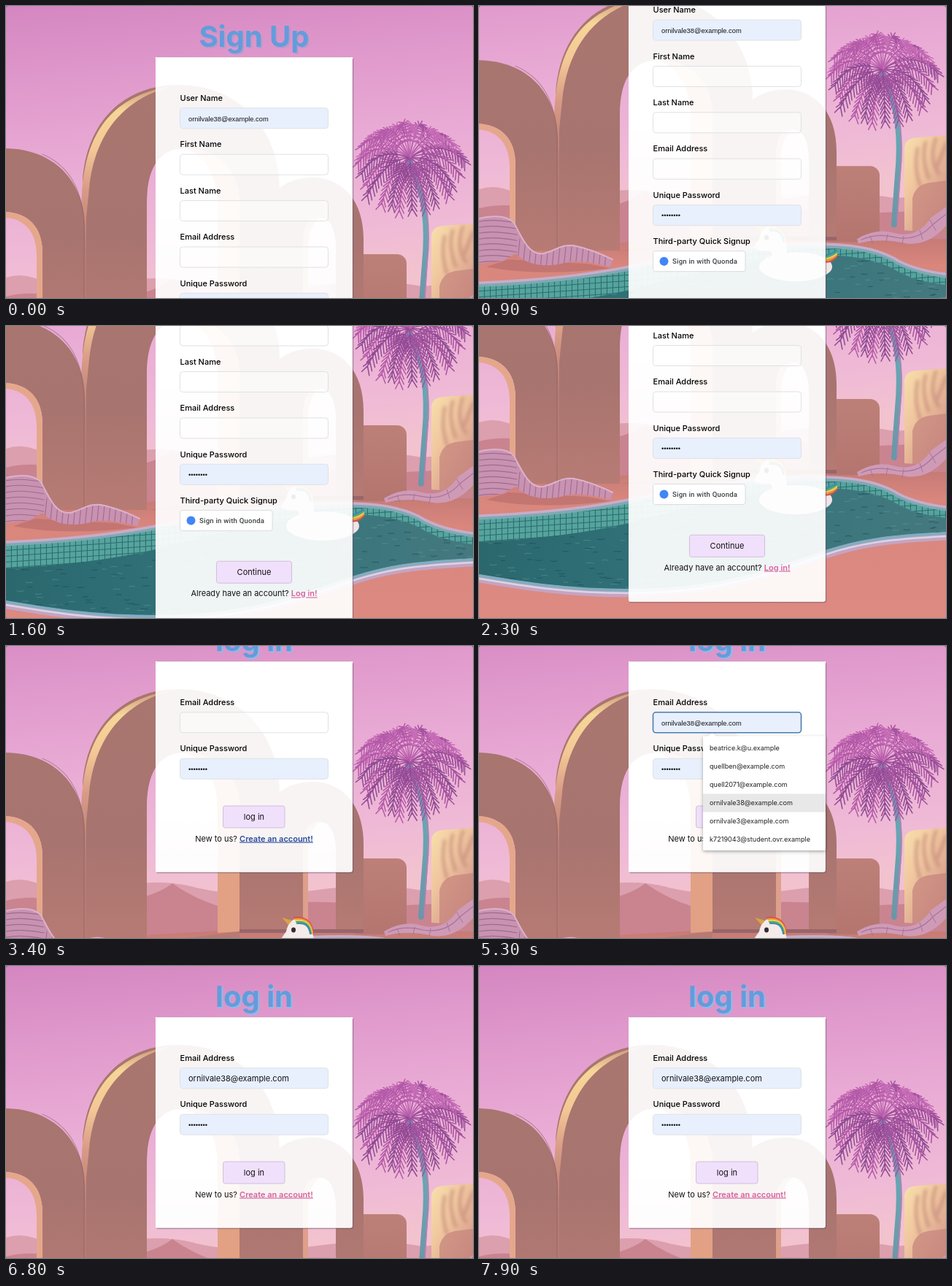
Write an HTML page that moves like this. It is 640 by 400 pixels and loops after 8000 ms.

```html
<!DOCTYPE html>
<html lang="en">
<head>
<meta charset="utf-8">
<title>Sign up and log in</title>
<style>
  html, body { margin: 0; width: 100%; height: 100%; overflow: hidden; background: #6d5c6c; }
  svg { display: block; width: 100vw; height: 100vh; border-radius: 3px; }
  text { font: 400 11px Inter, "Open Sans", sans-serif; fill: #111; }
  .title { font-size: 40px; font-weight: 700; text-anchor: middle; }
  .label { font-weight: 500; fill: #000; }
  .mid { text-anchor: middle; }
  .link { font-weight: 600; text-decoration: underline; }
  .plain { font: 400 9.3px "Liberation Sans", Arial, sans-serif; }
  .option { font-size: 9.1px; fill: #222; }
  .brand { font: 500 9.6px Roboto, sans-serif; fill: #3c4043; letter-spacing: .2px; }
</style>
</head>
<body>
<svg viewBox="0 0 640 400" preserveAspectRatio="none">
  <defs>
    <linearGradient id="sky" gradientUnits="userSpaceOnUse" x1="0" y1="0" x2="40" y2="410">
      <stop offset="0" stop-color="#d486c0"/><stop offset=".25" stop-color="#df98cb"/>
      <stop offset=".55" stop-color="#e9abd5"/><stop offset=".85" stop-color="#efbad6"/>
      <stop offset="1" stop-color="#f2c2cf"/>
    </linearGradient>
    <linearGradient id="veil" gradientUnits="userSpaceOnUse" x1="0" y1="280" x2="0" y2="420">
      <stop offset="0" stop-color="#fff"/><stop offset="1" stop-color="#fff" stop-opacity="0"/>
    </linearGradient>
    <linearGradient id="clay" gradientUnits="userSpaceOnUse" x1="0" y1="110" x2="0" y2="456">
      <stop offset="0" stop-color="#a97670"/><stop offset=".6" stop-color="#a8746f"/><stop offset="1" stop-color="#b77b74"/>
    </linearGradient>
    <linearGradient id="lit" gradientUnits="userSpaceOnUse" x1="0" y1="108" x2="0" y2="330">
      <stop offset="0" stop-color="#c99280"/><stop offset=".16" stop-color="#f6d697"/>
      <stop offset=".4" stop-color="#f3c795"/><stop offset=".65" stop-color="#d79a86"/><stop offset="1" stop-color="#b67d75"/>
    </linearGradient>
    <linearGradient id="cream" x1="0" y1="0" x2=".8" y2="1">
      <stop offset="0" stop-color="#f8e0ac"/><stop offset=".4" stop-color="#f0c79f"/><stop offset="1" stop-color="#cf8f86"/>
    </linearGradient>
    <linearGradient id="block" x1="0" y1="0" x2="0" y2="1">
      <stop offset="0" stop-color="#bd8079"/><stop offset="1" stop-color="#b4756f"/>
    </linearGradient>
    <linearGradient id="floor" gradientUnits="userSpaceOnUse" x1="0" y1="436" x2="0" y2="640">
      <stop offset="0" stop-color="#c47a75"/><stop offset=".2" stop-color="#d9867d"/><stop offset="1" stop-color="#dd8a83"/>
    </linearGradient>
    <linearGradient id="water" x1="0" y1="0" x2="1" y2="0">
      <stop offset="0" stop-color="#2a686e"/><stop offset=".5" stop-color="#33747a"/><stop offset="1" stop-color="#44797f"/>
    </linearGradient>
    <linearGradient id="trunk" x1="0" y1="0" x2="0" y2="1">
      <stop offset="0" stop-color="#7c80ac"/><stop offset=".4" stop-color="#67a6b4"/><stop offset="1" stop-color="#6b96a8"/>
    </linearGradient>
    <pattern id="tiles" width="8" height="8" patternUnits="userSpaceOnUse" patternTransform="skewY(-4)">
      <rect width="8" height="8" fill="#2d6a6c"/><rect width="7" height="7" fill="#55a49e"/>
    </pattern>
    <clipPath id="pool"><path id="poolShape"/></clipPath>
    <clipPath id="seat"><path id="seatShape"/></clipPath>
    <filter id="soft"><feGaussianBlur stdDeviation="2.2"/></filter>
    <filter id="lift" x="-10%" y="-10%" width="120%" height="125%">
      <feDropShadow dx="0" dy="1.5" stdDeviation="2" flood-color="#000" flood-opacity=".35"/>
    </filter>
  </defs>
  <g id="page">
    <g id="scene"></g>
    <g id="signup"></g>
    <g id="login"></g>
  </g>
  <g id="menu" filter="url(#lift)"></g>
</svg>
<script>
const $ = id => document.getElementById(id);
const LOOP = 8000, STEP = 100;
const PINK = [214, 98, 156], BLUE = [43, 76, 158];
const MAIL = 'ornilvale38@example.com';
const options = ['beatrice.k@u.example', 'quellben@example.com', 'quell2071@example.com',
  MAIL, 'ornilvale3@example.com', 'k7219043@student.ovr.example'];

let seed = 7;
const rand = (a, b) => {
  seed = (seed * 16807) % 2147483647;
  return a + (b - a) * seed / 2147483647;
};
const shape = (d, fill, more = '') => `<path d="${d}" fill="${fill}" ${more}/>`;
const line = (d, color, w, more = '') =>
  `<path d="${d}" fill="none" stroke="${color}" stroke-width="${w}" stroke-linecap="round" ${more}/>`;
const text = (x, y, s, cls, more = '') => `<text x="${x}" y="${y}" class="${cls}" ${more}>${s}</text>`;
const box = (x, y, w, h, fill, stroke = 'none', r = 3, more = '') =>
  `<rect x="${x}" y="${y}" width="${w}" height="${h}" rx="${r}" fill="${fill}" stroke="${stroke}" ${more}/>`;

// Scenery, in page coordinates
const BACK = 'M0 502 Q120 497 205 480 C300 462 380 447 475 449 Q540 450 575 472 Q600 485 640 490';
const FRONT = 'M640 524 C560 528 520 534 475 549 C400 575 330 602 205 602 C120 602 60 592 0 582';
const POOL = BACK + FRONT.replace('M', 'L') + 'Z';
const SEAT = 'M0 412 Q35 404 48 418 C62 445 70 462 88 460 C105 456 112 447 130 449 Q155 454 183 468 ' +
  'L180 478 Q140 468 120 472 Q95 479 75 474 Q60 470 50 460 L32 470 0 474Z';

function palm() {
  const cx = 553, cy = 208, tones = ['#8f4a93', '#b45aa8', '#c66bb6', '#a5529f'];
  let out = line('M551 212 C574 250 579 300 574 352 Q571 390 569 420', 'url(#trunk)', 8) +
    line('M555 218 C578 258 582 304 577 352 L573 418', '#b97fb0', 1.6);
  const count = 26;
  for (let i = 0; i < count; i++) {
    const a = (i * 7 % count) / count * Math.PI * 2 + rand(-.08, .08);
    const c = Math.cos(a), s = Math.sin(a), reach = rand(.85, 1);
    const tx = cx + 78 * c * reach, ty = 218 + (s < 0 ? 54 : 66) * s * reach;
    const mx = cx + 44 * c, my = 198 + 42 * s - 16;
    let d = `M${cx} ${cy}Q${mx} ${my} ${tx} ${ty}`;
    for (let u = .2; u <= 1; u += .065) {
      const v = 1 - u;
      const x = v * v * cx + 2 * u * v * mx + u * u * tx;
      const y = v * v * cy + 2 * u * v * my + u * u * ty;
      let dx = v * (mx - cx) + u * (tx - mx), dy = v * (my - cy) + u * (ty - my);
      const len = Math.hypot(dx, dy) || 1;
      dx /= len; dy /= len;
      for (const side of [-1, 1]) {
        const k = rand(7, 11) * (1.15 - u * .55);
        d += `M${x.toFixed(1)} ${y.toFixed(1)}l${(dx * 6 - dy * side * k).toFixed(1)} ${(dy * 6 + dx * side * k + 5).toFixed(1)}`;
      }
    }
    out += line(d, tones[i % 4], 1.5);
  }
  return out;
}

function ripples() {
  let light = '', dark = '';
  for (let i = 0; i < 420; i++) {
    const d = `M${rand(0, 640).toFixed(0)} ${rand(450, 602).toFixed(0)}q${rand(2, 5).toFixed(1)} ${rand(-2, 2).toFixed(1)} ${rand(5, 10).toFixed(1)} 0`;
    if (i % 2) light += d; else dark += d;
  }
  return line(light, '#74a5a4', .8, 'opacity=".55"') + line(dark, '#1b4d55', 1, 'opacity=".7"');
}

function unicorn() {
  const mane = ['#d9534f', '#ef9a3d', '#f2d34f', '#5aa878', '#3d8ea8'];
  return `<ellipse cx="434" cy="478" rx="50" ry="20" fill="#f0e4e6"/>` +
    shape('M384 440 Q388 421 402 423 Q419 426 421 446 Q424 464 418 478 L400 482 Q406 462 398 456 Q380 458 377 450Z', '#f5ebe9') +
    shape('M387 431 L378 421 L392 425Z', '#d8a445') +
    mane.map((c, i) => line(`M${395 + i} ${421 + i * 2} Q${419 - i} ${419 + i * 2} ${421 - i} 443`, c, 2.2)).join('') +
    `<ellipse cx="394" cy="438" rx="3" ry="3.4" fill="#352b36"/>` +
    mane.map((c, i) => line(`M474 ${471 - i * 2} Q482 ${473 - i * 3} 490 ${464 - i * 2}`, c, 2.4)).join('');
}

function slats() {
  let d = '';
  for (let y = 416; y < 474; y += 8) d += `M0 ${y}Q20 ${y - 4} 52 ${y + 2}`;
  for (let x = 56; x < 184; x += 8) d += `M${x} 440l-4 40`;
  return line(d, '#a2698f', 1.1);
}

function scenery() {
  const openA = 'M0 282 C30 284 50 302 50 338 V456 H0Z';
  const openB = 'M193 456 V270 C193 215 215 195 245 195 C290 195 320 225 320 270 V456Z';
  const openC = 'M407 442 V330 C407 300 415 290 430 290 C446 290 452 310 452 330 V442Z';
  const hole = 'fill-rule="evenodd"';
  return box(0, 0, 640, 640, 'url(#sky)', 'none', 0) +
    '<rect id="back" x="205" y="70" width="270" fill="url(#veil)"/>' +
    shape('M0 372 Q30 362 60 384 T130 380 Q215 366 260 380 Q330 396 420 384 Q500 372 570 384 L640 378 V460 H0Z', '#dc9fae') +
    shape('M0 398 Q40 388 90 402 Q190 404 228 374 Q258 396 300 408 Q430 392 500 406 L640 400 V460 H0Z', '#c98490') +
    shape('M0 452 L112 454 205 444 330 437 640 440 V640 H0Z', 'url(#floor)') +
    box(470, 340, 79, 104, 'url(#block)', 'none', 13) +
    shape('M583 428 V316 Q583 302 600 301 L640 298 V432Z', 'url(#cream)') +
    `<g filter="url(#soft)" opacity=".55">` +
    line('M612 308 Q606 330 616 356 M626 303 Q616 330 630 350 M601 316 Q596 342 604 366 M640 310 L628 340', '#c18478', 5) + '</g>' +
    shape('M594 430 V384 Q598 366 616 363 L640 360 V432Z', '#c5837d', 'opacity=".7"') +
    palm() +
    shape('M352 441 V300 C352 255 385 235 420 235 C460 235 490 265 490 320 V441Z' + openC, 'url(#clay)', hole) +
    shape('M407 441 V330 C407 300 415 290 430 290 C418 300 414 312 414 336 V441Z', '#dfa08b') +
    shape('M105 456 V240 C110 160 160 108 237 108 C320 108 375 170 375 250 V440 H320 L193 456Z' + openB, 'url(#clay)', hole) +
    shape('M320 440 V270 C320 225 290 195 245 195 C275 205 290 235 290 275 V442Z', '#e2a184') +
    shape('M104 456 L103 285 C103 190 130 122 237 108 C166 122 122 170 114 250 L110 290 V456Z', 'url(#lit)') +
    shape('M0 195 C66 196 108 240 108 304 V456 H0Z' + openA, 'url(#clay)', hole) +
    shape('M0 282 C30 284 50 302 50 338 V456 H42 V342 C42 310 26 292 0 290Z', '#e5a78c') +
    line('M50 203 Q104 226 107 300 V452', '#8c5f62', 1.2, 'opacity=".5"') +
    box(320, 437, 170, 5, '#98656a', 'none', 0) +
    shape('M518 440 Q545 424 570 432 Q600 440 620 410 L640 396 V422 Q615 450 585 446 Q550 438 520 446Z', '#cf9ab6') +
    line('M524 441 Q546 431 572 438 Q602 443 622 420 L640 406', '#a8749a', 1.2) +
    line('M536 436l4 10M560 434l-2 10M582 436l-2 11M604 428l4 12M618 414l8 14', '#a8749a', 1) +
    shape('M10 478 Q80 492 180 480 L150 474 40 468Z', '#b2686a', 'opacity=".55"') +
    shape(SEAT, '#c892b1') + `<g clip-path="url(#seat)">${slats()}</g>` +
    line('M0 412 Q35 404 48 418 C62 445 70 462 88 460 C105 456 112 447 130 449 Q155 454 183 468', '#ddb2cb', 2) +
    shape(POOL, 'url(#water)') + `<g clip-path="url(#pool)">${ripples()}</g>` +
    shape(BACK + 'L640 503 Q600 498 575 485 Q540 463 475 462 C380 465 300 485 205 510 Q120 530 0 536Z', 'url(#tiles)') +
    line(BACK, '#7fa9b4', 7) + line(BACK, '#c9acc8', 3.5, 'transform="translate(0 -2)"') +
    line(FRONT, '#c4a4c2', 11, 'transform="translate(0 4)"') +
    line(FRONT, '#83adc0', 4) + line(FRONT, '#dcd3e4', 2.5, 'transform="translate(0 4)"') +
    unicorn();
}

// Forms
const ROW = 63.4;
const card = h => box(205, 70, 270, h, '#fff', 'none', 3, 'fill-opacity=".92"') +
  line(`M475.5 73 V${68 + h} Q475.5 ${70.5 + h} 472 ${70.5 + h} H207`, '#5d4a60', 1.4, 'opacity=".45"') +
  line('M207 70 H473', '#a98ba6', .8, 'opacity=".5"');
const heading = (s, shade) => text(342, 58, s, 'title', `fill="${shade}" style="fill:${shade}"`) +
  text(340, 56, s, 'title', 'style="fill:#639cdc"');
const field = (i, label, filled, id = '') => text(238.5, 130 + ROW * i, label, 'label') +
  box(238.5, 139.8 + ROW * i, 203, 28, filled ? '#e8f0fe' : '#fff', '#dfe1e5', 4,
    `${id && `id="${id}"`} fill-opacity="${filled ? 1 : .35}"`);
const dots = i => text(250, 157.2 + ROW * i, '••••••••', 'plain');
const button = (x, y, w, s) => box(x, y, w, 30, '#f0e0fc', '#d2bfd9', 3) + text(340, y + 19, s, 'mid');
const prompt = (y, s, id, link) => text(340, y, `${s} <tspan id="${id}" class="link">${link}</tspan>`, 'mid');

$('poolShape').setAttribute('d', POOL);
$('seatShape').setAttribute('d', SEAT);
$('scene').innerHTML = scenery();
$('signup').innerHTML = card(548) + heading('Sign Up', '#b59ccb') +
  field(0, 'User Name', true) + text(250, 157.6, MAIL, 'plain') +
  field(1, 'First Name') + field(2, 'Last Name') + field(3, 'Email Address') +
  field(4, 'Unique Password', true) + dots(4) +
  text(238.5, 447, 'Third-party Quick Signup', 'label') +
  box(238.5, 456.5, 126.5, 28, '#fff', '#dadce0', 3) +
  '<circle cx="253.5" cy="470.5" r="6" fill="#4285f4"/>' +
  text(265, 474, 'Sign in with Quonda', 'brand') +
  button(288.5, 526.3, 103, 'Continue') +
  prompt(574.5, 'Already have an account?', 'toLogin', 'Log in!');
$('login').innerHTML = card(289) + heading('log in', '#8fbbe6') +
  field(0, 'Email Address', false, 'mail') + text(250, 157.6, '', 'plain', 'id="typed"') +
  field(1, 'Unique Password', true) + dots(1) +
  button(297.5, 268, 84.5, 'log in') +
  prompt(316.5, 'New to us?', 'toSignup', 'Create an account!');
$('menu').innerHTML = shape('M313 124 L319.5 119.5 326 124Z', '#fff') +
  box(307, 123.5, 168, 156.5, '#fff', 'none', 2) +
  '<rect id="hover" x="307" width="168" height="25" fill="#e8e8e8"/>' +
  options.map((s, i) => text(316, 143.3 + 25 * i, s, 'option')).join('');

const clamp = u => Math.max(0, Math.min(1, u));
const span = (t, a, b) => clamp((t - a) / (b - a));
const mix = u => `rgb(${PINK.map((p, i) => Math.round(p + (BLUE[i] - p) * u))})`;
const show = (id, on) => $(id).setAttribute('display', on ? 'inline' : 'none');

function scrollAt(t) {
  if (t < 3400) return 240 * (1 - Math.pow(1 - span(t, 100, 2100), 1.37));
  return 49 * Math.pow(1 - span(t, 6100, 6500), 2.08);
}

function draw(t) {
  const login = t >= 3400;
  $('page').setAttribute('transform', `translate(0 ${-scrollAt(t).toFixed(2)})`);
  show('signup', !login);
  show('login', login);
  $('back').setAttribute('height', login ? 289 : 548);
  $('toLogin').style.fill = mix(span(t, 2400, 2800));
  $('toSignup').style.fill = mix(1 - span(t, 3400, 3800));

  const pick = t < 4800 ? -1 : Math.min(3, Math.floor((t - 4800) / 100));
  const chosen = t >= 5400, focus = t >= 4500 && t < 6700;
  show('menu', t >= 4600 && !chosen);
  show('hover', pick >= 0);
  $('hover').setAttribute('y', 202.5 + 25 * (pick - 3));

  const mail = $('mail');
  mail.setAttribute('fill', pick < 0 ? '#fff' : '#e8f0fe');
  mail.setAttribute('fill-opacity', pick < 0 ? .35 : 1);
  mail.setAttribute('stroke', focus ? '#4d7cab' : '#dfe1e5');
  mail.setAttribute('stroke-width', focus ? 1.6 : 1);
  $('typed').textContent = pick < 0 ? '' : options[pick];
  $('typed').setAttribute('class', chosen ? '' : 'plain');
}

const start = performance.now();
function tick() {
  const t = (performance.now() - start) % LOOP;
  draw(Math.floor(t / STEP) * STEP);
  requestAnimationFrame(tick);
}
draw(0);
requestAnimationFrame(tick);
</script>
</body>
</html>
```
